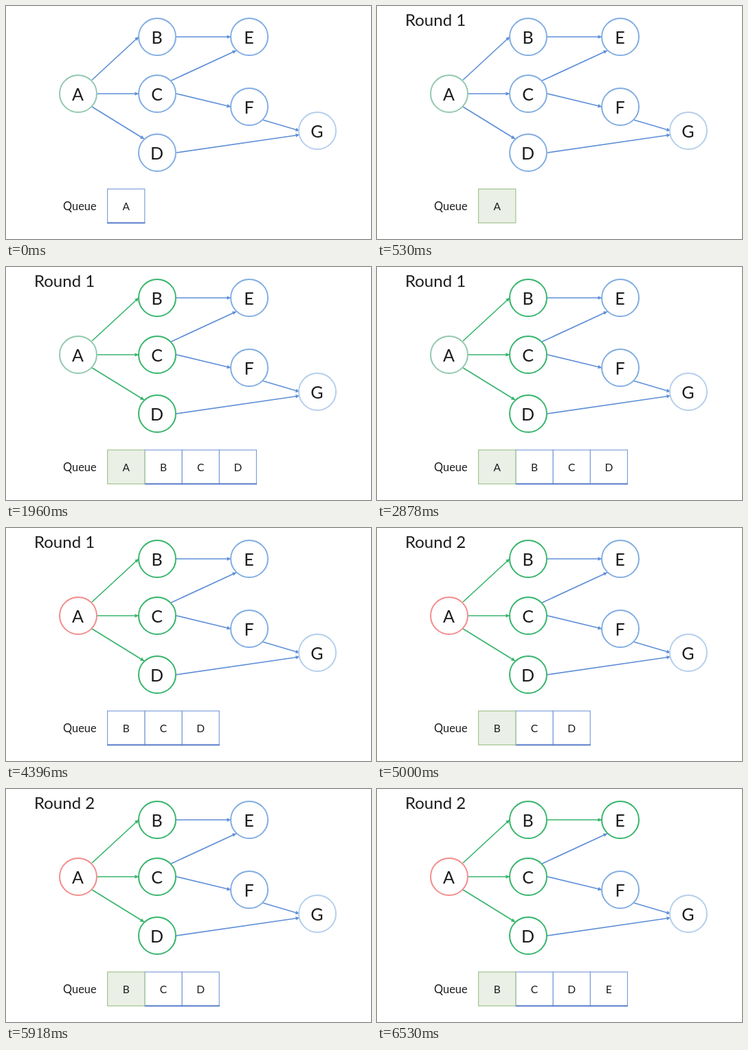
An HTML page that plays this animation: 531 by 340 pixels, repeating every 8 s.

```html
<!DOCTYPE html>
<html lang="en">
<head>
<meta charset="utf-8">
<title>Breadth-first search</title>
<style>
  html, body { margin: 0; width: 100%; height: 100%; overflow: hidden; background: #fff; }
  svg { display: block; width: 531px; height: 340px; }
  text { font-family: Lato, "Open Sans", sans-serif; fill: #1c1c1c; }
  .label { font-size: 25px; text-anchor: middle; }
  .item { font-size: 15.5px; text-anchor: middle; }
  .ring { fill: #fff; stroke-width: 2; }
  .edge { stroke-width: 1.7; }
</style>
</head>
<body>
<svg id="stage" viewBox="0 0 531 340">
  <text id="round" x="41" y="29" font-size="24"></text>
  <g id="edges"></g>
  <g id="nodes"></g>
  <text x="83" y="298" font-size="16.4">Queue</text>
  <g id="queue"></g>
</svg>
<script>
const LOOP = 8000;
const COLOR = {
  idle: '#82aee2', far: '#b5cfec', edge: '#5f8fd8', start: '#92c9ae',
  seen: '#38b56c', done: '#f48c8c', cell: '#7f9fdc', base: '#5b7fcb',
  headFill: '#eaf0e6', headLine: '#a2c48f'
};

const NODES = {
  A: [105, 128], B: [220, 45], C: [220, 128], D: [220, 214],
  E: [354, 45], F: [354, 147], G: [453, 182]
};

const EDGES = {
  AB: [125, 108, 193, 45], AC: [133, 128, 193, 128], AD: [125, 147, 201, 194],
  BE: [248, 45, 327, 45], CE: [240, 109, 335, 65], CF: [248, 128, 327, 147],
  FG: [373, 166, 427, 182], DG: [248, 214, 427, 188]
};

// at: start time, active: the head of the queue is being visited
const STEPS = [
  { at: 0, round: '', queue: 'A', active: false, seen: '', done: '', used: [] },
  { at: 530, round: 'Round 1', queue: 'A', active: true, seen: '', done: '', used: [] },
  { at: 1960, round: 'Round 1', queue: 'ABCD', active: true, seen: 'BCD', done: '', used: ['AB', 'AC', 'AD'] },
  { at: 3490, round: 'Round 1', queue: 'BCD', active: false, seen: 'BCD', done: 'A', used: ['AB', 'AC', 'AD'] },
  { at: 5000, round: 'Round 2', queue: 'BCD', active: true, seen: 'BCD', done: 'A', used: ['AB', 'AC', 'AD'] },
  { at: 6530, round: 'Round 2', queue: 'BCDE', active: true, seen: 'BCDE', done: 'A', used: ['AB', 'AC', 'AD', 'BE'] }
];

const byId = id => document.getElementById(id);

function add(parent, tag, attrs, text) {
  const el = document.createElementNS('http://www.w3.org/2000/svg', tag);
  for (const key in attrs) el.setAttribute(key, attrs[key]);
  if (text) el.textContent = text;
  return parent.appendChild(el);
}

function makeEdge([x1, y1, x2, y2]) {
  const g = add(byId('edges'), 'g', { class: 'edge' });
  const angle = Math.atan2(y2 - y1, x2 - x1) * 180 / Math.PI;
  add(g, 'line', { x1, y1, x2, y2 });
  add(g, 'path', {
    d: 'M0 0L-5.5 -2.8V2.8Z', stroke: 'none',
    transform: `translate(${x2} ${y2}) rotate(${angle})`
  });
  return g;
}

function makeNode(name) {
  const [x, y] = NODES[name];
  const ring = add(byId('nodes'), 'circle', { class: 'ring', cx: x, cy: y, r: 27 });
  add(byId('nodes'), 'text', { class: 'label', x: x - 0.5, y: y + 10 }, name);
  return ring;
}

const edges = {}, rings = {};
for (const key in EDGES) edges[key] = makeEdge(EDGES[key]);
for (const name in NODES) rings[name] = makeNode(name);

function nodeColor(name, step) {
  if (step.done.includes(name)) return COLOR.done;
  if (step.seen.includes(name)) return COLOR.seen;
  return name === 'A' ? COLOR.start : name === 'G' ? COLOR.far : COLOR.idle;
}

function drawCell(name, index, active) {
  const queue = byId('queue');
  const width = 54.2, top = 267, height = 49.5;
  const x = 147.6 + index * width;
  add(queue, 'rect', {
    x, y: top, width, height, 'stroke-width': 1.2,
    fill: active ? COLOR.headFill : '#fff',
    stroke: active ? COLOR.headLine : COLOR.cell
  });
  if (!active) {
    add(queue, 'path', {
      d: `M${x - 0.5} ${top + height}h${width + 1}`,
      stroke: COLOR.base, 'stroke-width': 1.8
    });
  }
  add(queue, 'text', { class: 'item', x: x + width / 2, y: 298 }, name);
}

function show(step) {
  byId('round').textContent = step.round;
  for (const key in edges) {
    const color = step.used.includes(key) ? COLOR.seen : COLOR.edge;
    edges[key].setAttribute('stroke', color);
    edges[key].setAttribute('fill', color);
  }
  for (const name in rings) rings[name].setAttribute('stroke', nodeColor(name, step));
  byId('queue').replaceChildren();
  // The head is drawn last so its border stays on top.
  [...step.queue].map((name, i) => [name, i]).reverse()
    .forEach(([name, i]) => drawCell(name, i, step.active && i === 0));
}

const begin = performance.now();
let current = null;

function tick() {
  const time = (performance.now() - begin) % LOOP;
  const step = STEPS.findLast(s => s.at <= time);
  if (step !== current) show(current = step);
  requestAnimationFrame(tick);
}
tick();
</script>
</body>
</html>
```
